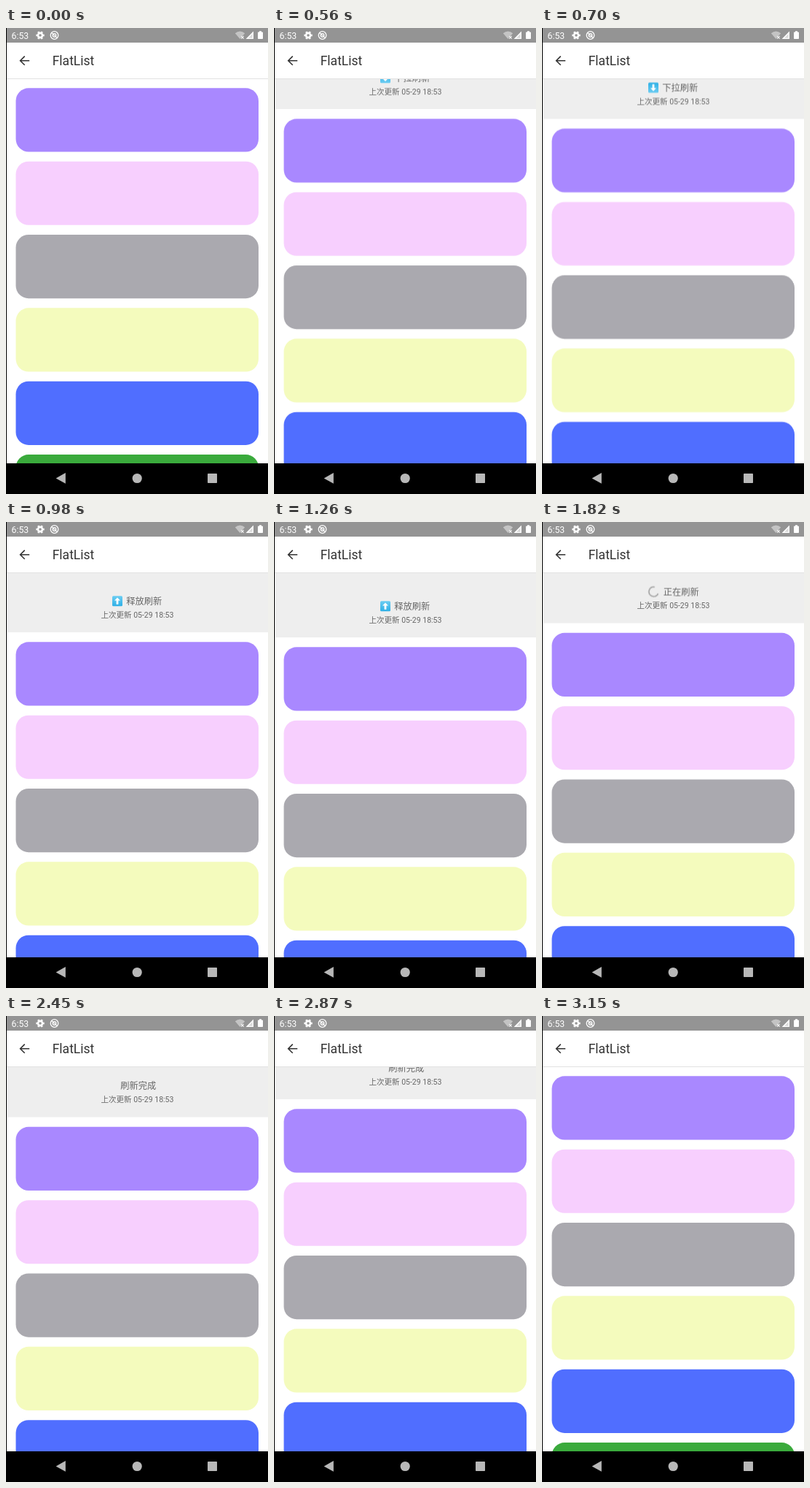
Recreate the animation shown at these times as an HTML page. Size 360 by 638 pixels, loop 3220 ms.

```html
<!DOCTYPE html>
<html lang="zh-CN">
<head>
<meta charset="utf-8">
<title>FlatList</title>
<style>
html, body { margin: 0; width: 100%; height: 100%; overflow: hidden; background: #fff; }
svg { display: block; width: 360px; height: 638px; font-family: Roboto, "Noto Sans CJK SC", "Noto Sans CJK", "Noto Sans", sans-serif; }

/* One loop is 46 ticks of 70 ms; the list moves once per tick. */
#list, .state, #spin, #arc { animation: 3220ms linear infinite; }
#list { animation-name: pull; }
@keyframes pull {
  0%       { transform: translateY(0); animation-timing-function: steps(2); }
  4.3478%  { transform: translateY(5px); animation-timing-function: steps(3); }
  10.8696% { transform: translateY(22px); animation-timing-function: steps(5); }
  21.7391% { transform: translateY(55.5px); animation-timing-function: steps(4); }
  30.4348% { transform: translateY(82px); animation-timing-function: steps(2); }
  34.7826% { transform: translateY(87px); animation-timing-function: steps(2); }
  39.1304% { transform: translateY(89px); animation-timing-function: steps(1); }
  41.3043% { transform: translateY(88px); animation-timing-function: steps(1); }
  43.4783% { transform: translateY(83px); animation-timing-function: steps(2); }
  47.8261% { transform: translateY(73px); animation-timing-function: steps(2); }
  52.1739%, 84.7826% { transform: translateY(69.5px); animation-timing-function: steps(1); }
  86.9565% { transform: translateY(62px); animation-timing-function: steps(1); }
  89.1304% { transform: translateY(45px); animation-timing-function: steps(1); }
  91.3043% { transform: translateY(26px); animation-timing-function: steps(1); }
  93.4783% { transform: translateY(11px); animation-timing-function: steps(1); }
  95.6522% { transform: translateY(3px); animation-timing-function: steps(1); }
  97.8261%, 100% { transform: translateY(0); }
}

.state { opacity: 0; animation-timing-function: step-end; }
#down { animation-name: down; }
#up { animation-name: up; }
#busy { animation-name: busy; }
#done { animation-name: done; }
@keyframes down { 0% { opacity: 1; } 28.2609%, 100% { opacity: 0; } }
@keyframes up   { 0% { opacity: 0; } 28.2609% { opacity: 1; } 41.3043%, 100% { opacity: 0; } }
@keyframes busy { 0% { opacity: 0; } 41.3043% { opacity: 1; } 76.087%, 100% { opacity: 0; } }
@keyframes done { 0% { opacity: 0; } 76.087%, 100% { opacity: 1; } }

/* The arc grows, then its tail catches up, while the whole ring turns. */
#spin { transform-origin: 153.5px 26px; animation-name: spin; }
@keyframes spin {
  0%, 41.3043% { transform: rotate(-90deg); }
  82.6087%, 100% { transform: rotate(215deg); }
}
#arc { animation-name: arc; }
@keyframes arc {
  0%, 41.3043% { stroke-dasharray: 3 100; stroke-dashoffset: 0; animation-timing-function: cubic-bezier(.4, 0, .2, 1); }
  61.9565% { stroke-dasharray: 75 100; stroke-dashoffset: 0; animation-timing-function: cubic-bezier(.4, 0, .2, 1); }
  82.6087%, 100% { stroke-dasharray: 3 100; stroke-dashoffset: -75; }
}
</style>
</head>
<body>
<svg viewBox="0 0 360 638">
  <defs>
    <linearGradient id="sky" x2="0" y2="1">
      <stop stop-color="#6ccdf2"/>
      <stop offset="1" stop-color="#2fb0e6"/>
    </linearGradient>
    <g id="key">
      <rect x="-7" y="-7" width="14" height="14" rx="1.5" fill="url(#sky)"/>
      <path d="M0-4.8 4-.6H1.4V4.6H-1.4V-.6H-4z" fill="#fff"/>
    </g>
  </defs>
  <rect width="360" height="638" fill="#fff"/>

  <g id="list">
    <rect y="-60" width="360" height="129" fill="#eee"/>
    <g font-size="12.25" fill="#666">
      <g class="state" id="down">
        <use href="#key" transform="translate(153 26.2) scale(1 -1)"/>
        <text x="165.3" y="30.5">下拉刷新</text>
      </g>
      <g class="state" id="up">
        <use href="#key" transform="translate(153 26.2)"/>
        <text x="165.3" y="30.5">释放刷新</text>
      </g>
      <g class="state" id="busy">
        <g id="spin">
          <circle id="arc" cx="153.5" cy="26" r="6.6" pathLength="100" fill="none" stroke="#999" stroke-width="1.5"/>
        </g>
        <text x="166.8" y="30.5">正在刷新</text>
      </g>
      <g class="state" id="done">
        <text x="157.3" y="30.5">刷新完成</text>
      </g>
      <text x="180.5" y="48.5" font-size="10.5" text-anchor="middle">上次更新 05-29 18:53</text>
    </g>
    <g id="cards"></g>
  </g>

  <rect y="20" width="360" height="49" fill="#fff"/>
  <rect y="69" width="360" height="1" fill="#e2e2e2"/>
  <path d="M32.2 44.7H20M25.7 38.6l-6.1 6.1 6.1 6.1" fill="none" stroke="#333" stroke-width="1.6"/>
  <text x="63.7" y="51.3" font-size="17.5" fill="#333">FlatList</text>

  <rect width="360" height="20" fill="#949494"/>
  <g fill="#fff">
    <text x="7.6" y="14.6" font-size="12.25">6:53</text>
    <circle cx="47" cy="10" r="3.1" fill="none" stroke="#fff" stroke-width="2.6"/>
    <circle cx="47" cy="10" r="4.9" fill="none" stroke="#fff" stroke-width="1.6" pathLength="12" stroke-dasharray="1 1" stroke-dashoffset=".5"/>
    <g fill="none" stroke="#fff" stroke-width="1.3">
      <circle cx="66.5" cy="10" r="5.3"/>
      <circle cx="66.5" cy="10" r="2.3"/>
      <path d="M62.9 6.6l7.4 7"/>
    </g>
    <path d="M314.8 7.2Q321.5 1.8 328.2 7.2L321.5 15z" opacity=".45"/>
    <path d="M323.2 11.2l3.4 3.4m0-3.4l-3.4 3.4" stroke="#fff" stroke-width="1.1"/>
    <path d="M340 4.6V15H329.6z"/>
    <path d="M338.7 8v5.7H333z" fill="#949494" opacity=".35"/>
    <path d="M348 4.2h3v1.2h1.2q.8 0 .8.8v8q0 .8-.8.8h-5.4q-.8 0-.8-.8v-8q0-.8.8-.8H348z"/>
  </g>

  <rect y="596" width="360" height="42"/>
  <g fill="#b8b8b8">
    <path d="M68.6 616.4 81.8 609V623.8z"/>
    <circle cx="180.2" cy="616.5" r="6.6"/>
    <rect x="277" y="610" width="13" height="13" rx=".8"/>
  </g>
  <rect width="1" height="638"/>
</svg>
<script>
const colors = ["#a988ff", "#f7cffe", "#aaa9af", "#f4fbbd", "#506eff", "#3aaa3c"];
document.getElementById("cards").innerHTML =
  '<rect y="69" width="360" height="640" fill="#fff"/>' +
  colors.map((fill, i) =>
    `<rect x="13.5" y="${82.3 + i * 100.35}" width="333.5" height="87.2" rx="17.5" fill="${fill}"/>`
  ).join("");
</script>
</body>
</html>
```
